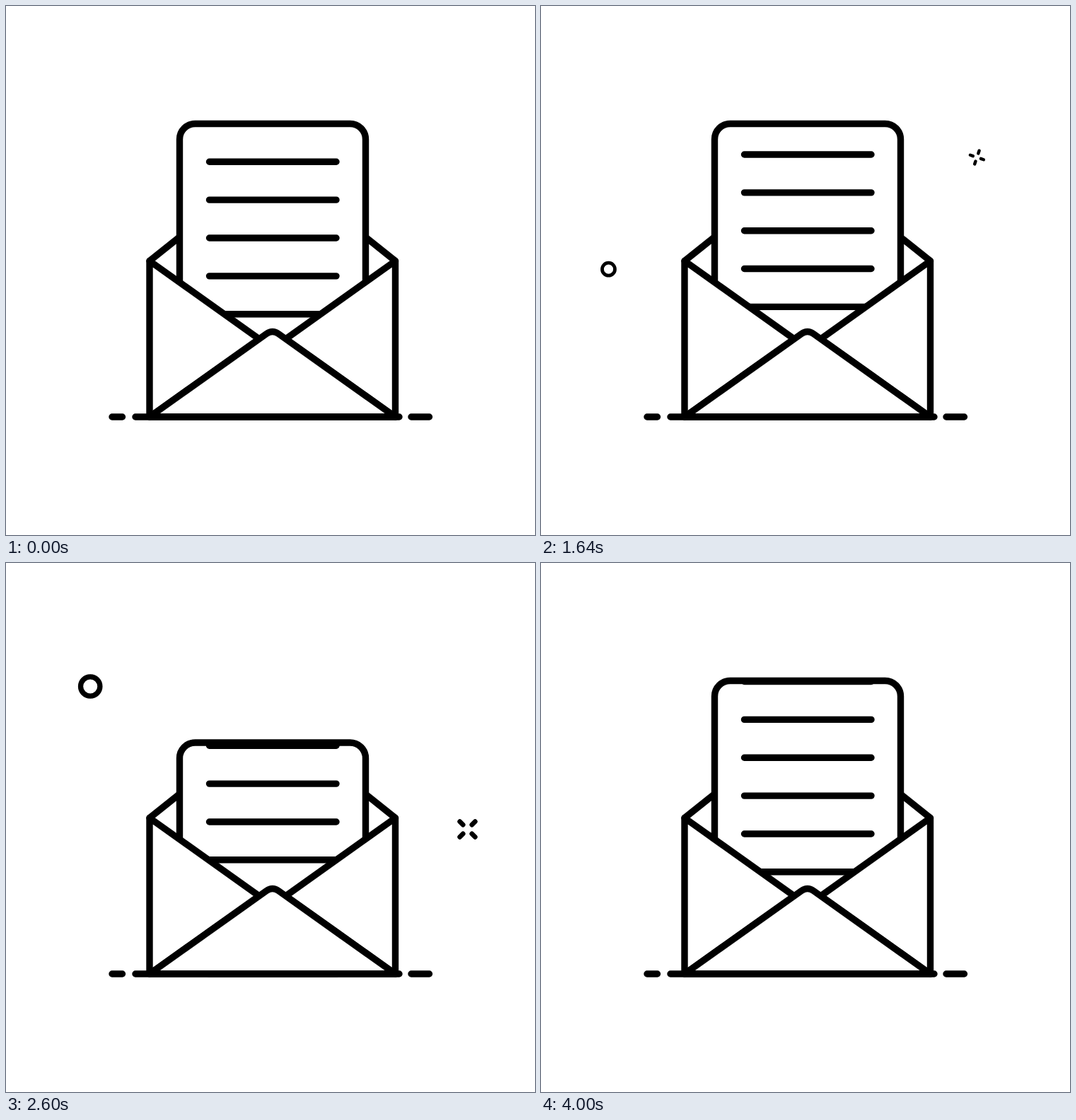
Animation of 748 by 748 pixels, one loop 4.08 s. Source, as an HTML page:

```html
<!DOCTYPE html>
<html lang="en">
<head>
<meta charset="utf-8">
<title>Open letter</title>
<style>
  html, body { margin: 0; width: 100%; height: 100%; overflow: hidden; background: #fff; }
  svg { display: block; width: 100%; height: 100%; }
</style>
</head>
<body>
<svg viewBox="0 0 748 748" fill="#fff" stroke="#000" stroke-width="9.4" stroke-linecap="round" stroke-linejoin="round">
  <defs>
    <clipPath id="paperClip"><rect id="clipBox" x="241" width="272" height="400"/></clipPath>
  </defs>

  <path d="M203 360.5L250 323M550.5 360.5L503.5 323"/>
  <path id="paper"/>
  <g clip-path="url(#paperClip)"><path id="rows"/></g>

  <path d="M203 581V360.5L358 470.8ZM550.5 581V360.5L395.5 470.8Z"/>
  <path d="M203 581L368.3 463.5Q376.8 457.6 385.3 463.5L550.5 581Z"/>
  <path d="M150 581H164.5M183 581H556M573 581H598.5"/>

  <circle id="ring" r="14.6" stroke-width="7.8"/>
  <path id="spark" d="M9.5 0H16.3M-9.5 0H-16.3M0 9.5V16.3M0 -9.5V-16.3" stroke-width="7.2"/>
</svg>
<script>
  const LOOP = 4080, STEP = 40, END = 4000;
  const ROW_GAP = 53.85, ROW_COUNT = 12, SCROLL = 322;
  const PAPER_TOP = 166.5, PAPER_DROP = 135;
  const DECOR_START = 1000, DECOR_PEAK = 2300, DECOR_END = 3500;

  // Way points: time, x, y
  const ringPath = [
    [1000, 150, 496], [1240, 123.7, 452], [1680, 93.5, 364], [2040, 85.5, 287.5],
    [2240, 90, 245.5], [2600, 119.2, 174.5], [3120, 205, 107], [3500, 283, 84.5]
  ];
  const sparkPath = [
    [1000, 541, 131], [1120, 560, 143], [1240, 574.5, 158], [1680, 620, 220],
    [2040, 644.5, 279.5], [2240, 649.5, 314], [2600, 652.5, 376.5], [3120, 630, 465.5],
    [3500, 602, 525]
  ];

  const el = id => document.getElementById(id);
  const paper = el('paper'), rows = el('rows'), clipBox = el('clipBox');
  const ring = el('ring'), spark = el('spark');

  const clamp01 = v => Math.min(1, Math.max(0, v));
  const ramp = (t, from, to) => clamp01((t - from) / (to - from));
  const smooth = p => p * p * (3 - 2 * p);

  // Smooth curve through timed points, with tangents taken from the neighbours
  function follow(points, t) {
    const last = points.length - 1;
    let i = 0;
    while (i < last - 1 && t >= points[i + 1][0]) i++;
    const a = points[i], b = points[i + 1], span = b[0] - a[0];
    const p = ramp(t, a[0], b[0]);
    const slope = (n, axis) => {
      const before = points[Math.max(0, n - 1)], after = points[Math.min(last, n + 1)];
      return (after[axis] - before[axis]) / (after[0] - before[0]);
    };
    return [1, 2].map(axis =>
      a[axis] + (b[axis] - a[axis]) * smooth(p) +
      span * p * (1 - p) * (slope(i, axis) * (1 - p) - slope(i + 1, axis) * p));
  }

  function place(node, points, t, scale, angle) {
    const [x, y] = follow(points, t);
    node.style.display = scale > 0.01 ? '' : 'none';
    node.setAttribute('transform', `translate(${x} ${y}) rotate(${angle}) scale(${scale})`);
  }

  function draw(t) {
    const top = PAPER_TOP + PAPER_DROP * (smooth(ramp(t, 2000, 3000)) - smooth(ramp(t, 3000, END)));
    paper.setAttribute('d',
      `M245.5 500V${top + 22}a22 22 0 0 1 22 -22H486.5a22 22 0 0 1 22 22V500`);
    clipBox.setAttribute('y', top - 3);

    const firstRow = 220.3 - SCROLL * smooth(t / END);
    let lines = '';
    for (let i = 0; i < ROW_COUNT; i++) lines += `M287.5 ${firstRow + i * ROW_GAP}H467`;
    rows.setAttribute('d', lines);

    const scale = 1.25 * Math.min(ramp(t, DECOR_START, DECOR_PEAK), 1 - ramp(t, DECOR_PEAK, DECOR_END));
    place(ring, ringPath, t, scale, 0);
    place(spark, sparkPath, t, scale, 45 + 0.121 * (t - 2600));
  }

  function tick() {
    const t = performance.now() % LOOP;
    draw(Math.min(END, Math.floor(t / STEP) * STEP));
    requestAnimationFrame(tick);
  }
  tick();
</script>
</body>
</html>
```
